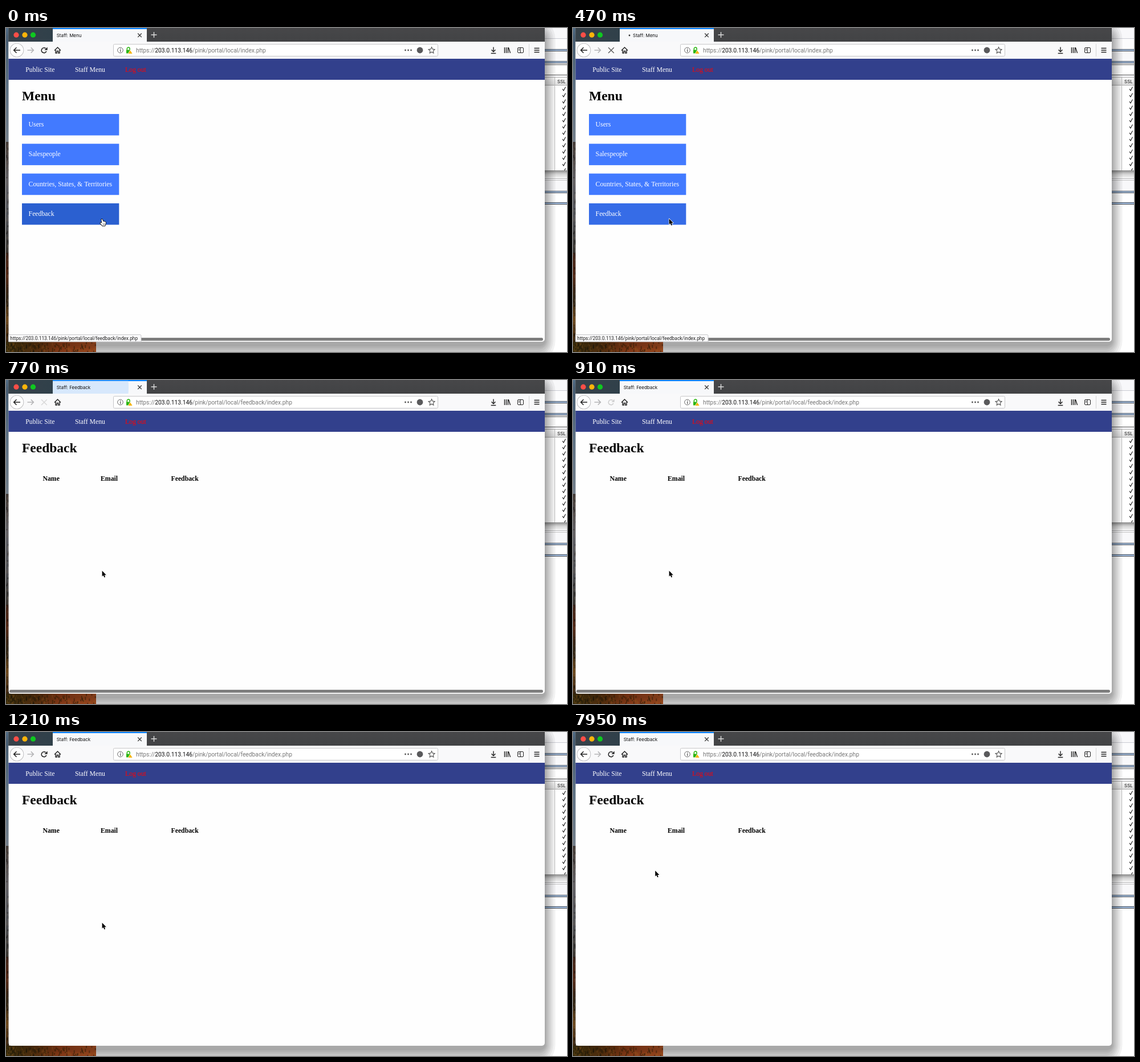
Animation of 984x569 px, one loop 8 s. Source, as an HTML page with a canvas:

```html
<!DOCTYPE html>
<html lang="en">
<head>
<meta charset="utf-8">
<title>Staff pages</title>
<style>
html, body { margin: 0; width: 100%; height: 100%; overflow: hidden; background: #fff; }
canvas { display: block; width: 984px; height: 569px; }
</style>
</head>
<body>
<canvas id="stage" width="984" height="569"></canvas>
<script>
const W = 984, H = 569, LOOP = 8000;
const SERIF = '"Liberation Serif", Times, serif';
const SANS = 'Roboto, "Liberation Sans", sans-serif';
const UI = 'Inter, "Liberation Sans", sans-serif';
const HOST = '203.0.113.146', DIR = '/pink/portal/local';
const stage = document.getElementById('stage').getContext('2d');
let g = stage;

function box(x, y, w, h, fill) {
  g.fillStyle = fill;
  g.fillRect(x, y, w, h);
}
function round(x, y, w, h, r, fill, edge) {
  g.beginPath();
  g.roundRect(x, y, w, h, r);
  if (fill) { g.fillStyle = fill; g.fill(); }
  if (edge) { g.strokeStyle = edge; g.lineWidth = 1; g.stroke(); }
}
function disc(x, y, r, fill) {
  g.beginPath();
  g.arc(x, y, r, 0, 7);
  g.fillStyle = fill;
  g.fill();
}
function stroke(d, color = '#222', width = 1.4) {
  g.strokeStyle = color;
  g.lineWidth = width;
  g.stroke(new Path2D(d));
}
function shape(d, color) {
  g.fillStyle = color;
  g.fill(new Path2D(d));
}
function text(s, x, y, font, color) {
  g.font = font;
  g.fillStyle = color;
  g.fillText(s, x, y);
  return x + g.measureText(s).width;
}
function ramp(y0, y1, ...colors) {
  const grad = g.createLinearGradient(0, y0, 0, y1);
  colors.forEach((c, i) => grad.addColorStop(i / (colors.length - 1), c));
  return grad;
}
function faded(alpha, draw) {
  if (alpha <= 0) return;
  g.save();
  g.globalAlpha = alpha;
  draw();
  g.restore();
}
let seed = 11;
function rnd() {
  seed = (seed * 16807) % 2147483647;
  return seed / 2147483647;
}

function landscape() {
  box(0, 0, 5, 205, ramp(0, 205, '#5f7f9d', '#86a3bf', '#a8b9ca'));
  box(0, 200, 5, 200, ramp(200, 400, '#60544e', '#8e8d94', '#777a82', '#4c4740'));
  box(0, 395, 5, 156, ramp(395, 551, '#5d3424', '#7b3b20', '#4a3a22', '#a06a2a', '#5b3a18'));
  for (let i = 0; i < 110; i++)
    box(rnd() * 4, 205 + rnd() * 345, 2, 2 + rnd() * 4, rnd() < .5 ? 'rgba(20,18,15,.35)' : 'rgba(190,160,130,.2)');
  const ground = g.createLinearGradient(0, 0, 158, 0);
  ground.addColorStop(0, '#4b3a12');
  ground.addColorStop(.35, '#6c3a12');
  ground.addColorStop(.6, '#a9481a');
  ground.addColorStop(1, '#c25a26');
  box(0, 551, 158, 18, ground);
  for (let i = 0; i < 150; i++) {
    const x = rnd() ** 1.6 * 156;
    box(x, 551 + rnd() * 18, 2, 2 + rnd() * 5, rnd() < .7 ? 'rgba(25,25,5,.4)' : 'rgba(200,130,40,.3)');
  }
}

function backWindow() {
  box(940, 0, 44, 310, '#f8f8fa');
  box(940, 18, 44, 1, '#c9cad2');
  box(940, 19, 44, 18, '#fcfcfd');
  for (const y of [37, 58, 286, 306]) {
    box(940, y, 44, 1, '#48525f');
    box(940, y + 1, 44, 2, '#a9c3e4');
    box(940, y + 3, 44, 1, '#3a3f47');
  }
  box(940, 64, 44, 18, '#fff');
  box(940, 64, 44, 1, '#555');
  box(940, 82, 44, 1, '#555');
  box(940, 87, 44, 14, ramp(87, 101, '#fafafa', '#dcdcdc'));
  box(940, 86, 44, 1, '#aaa');
  box(940, 100, 44, 1, '#aaa');
  box(940, 101, 44, 149, '#fff');
  box(962, 87, 1, 163, '#c4c4c4');
  text('SSL', 967, 96.5, '8px ' + UI, '#111');
  g.save();
  g.beginPath();
  g.rect(960, 101, 24, 149);
  g.clip();
  for (let i = 0; i < 14; i++) {
    const y = 107 + i * 11;
    stroke(`M976 ${y} l2 3 l3.5 -6.5`, '#111', 1.1);
  }
  g.restore();
  box(940, 250, 44, 13, ramp(250, 263, '#8c8c8c', '#d3d3d3', '#f2f2f2'));
  box(940, 264, 44, 1, '#b5b5b5');
  box(940, 267, 44, 1, '#c4c4c4');
  box(940, 290, 44, 16, '#fff');
}

function shadow() {
  for (const d of [31, 25, 20, 16, 12, 8, 5, 2])
    round(4 - d * .6, 12 - d, 941 + d * 1.2, 545 + d * 2, 8 + d, 'rgba(0,0,0,.052)');
}

function toolbar() {
  box(4.5, 24, 940.5, 30, '#f9f9fa');
  disc(19, 39, 12.3, '#b8b8ba');
  disc(19, 39, 11.4, '#fff');
  stroke('M25 39 H14 M18.5 34.2 L13.7 39 L18.5 43.8', '#222', 1.6);
  stroke('M37.5 39 H48 M43.8 34.4 L48.4 39 L43.8 43.6', '#b4b4b6', 1.5);
  stroke('M85 39.5 L90.5 34 L96 39.5 M87 38.5 V44 H89.3 V40.5 H91.7 V44 H94 V38.5', '#222', 1.4);

  round(188.5, 28.5, 569, 21, 2, '#fff', '#c6c6c8');
  g.beginPath();
  g.arc(200.5, 39, 4.8, 0, 7);
  g.strokeStyle = '#666';
  g.lineWidth = 1;
  g.stroke();
  box(200, 38, 1.2, 4, '#555');
  box(200, 36, 1.2, 1.2, '#555');
  stroke('M212.3 39 V36.5 A2.4 2.4 0 0 1 217.1 36.5 V39', '#2ab510', 1.5);
  box(211, 38.5, 7, 6, '#2ab510');
  shape('M218 38 L222.3 45.3 H213.7 Z', '#fff');
  shape('M218 39.2 L221.6 45 H214.4 Z', '#f5b50a');
  for (const x of [700.5, 705.5, 710.5]) disc(x, 39, 1.4, '#555');
  disc(726, 39, 5.4, '#5a5a5c');
  let star = '';
  for (let i = 0; i < 10; i++) {
    const a = i * Math.PI / 5, r = i % 2 ? 2.8 : 5.8;
    star += `${i ? 'L' : 'M'}${746.6 + r * Math.sin(a)} ${39.4 - r * Math.cos(a)}`;
  }
  stroke(star + 'Z', '#555', 1.1);

  stroke('M855 33.5 V41.5 M851.5 38.3 L855 41.8 L858.5 38.3 M850.7 44.5 H859.3');
  stroke('M874.5 34 V44 M877.5 34 V44 M880.5 34 V44 M881.5 34.5 L884.5 44');
  round(897.5, 34.5, 10, 9, 1.5, null, '#222');
  stroke('M902.3 34.5 V43.5 M899 37 H901 M899 39 H901', '#222', 1);
  box(917, 28, 1, 22, '#d4d4d6');
  stroke('M926.5 35.5 H935.5 M926.5 39 H935.5 M926.5 42.5 H935.5');
}

function chrome() {
  round(4.5, -10, 940.5, 561, [0, 0, 5, 5], '#fefefe');
  box(4.5, 0, 940.5, 24, ramp(0, 24, '#474749', '#424345'));
  const tint = g.createLinearGradient(4, 0, 82, 0);
  tint.addColorStop(0, '#37424a');
  tint.addColorStop(1, '#30404a');
  box(4.5, 0, 77.5, 24, tint);
  disc(18, 12.2, 4.6, '#fc4e47');
  disc(33, 12.2, 4.6, '#fdb40a');
  disc(47.5, 12.2, 4.6, '#0fc820');
  box(82, 0, 165, 24, '#f7f8fa');
  box(82, 0, 165, 2, '#0a84ff');
  stroke('M254.5 12 H264.5 M259.5 7 V17', '#ddd', 1.4);
  toolbar();
  box(4.5, 54, 940.5, 37, '#32408c');
  const nav = '11.75px ' + SERIF;
  text('Public Site', 34.3, 77, nav, '#fff');
  text('Staff Menu', 121, 77, nav, '#fff');
  text('Log out', 209, 77, nav, '#f00');
}

const backdrop = document.createElement('canvas');
backdrop.width = W;
backdrop.height = H;
g = backdrop.getContext('2d');
box(0, 0, W, H, '#fff');
landscape();
backWindow();
shadow();
chrome();
g = stage;

// latest value whose start time has passed
function step(t, keys) {
  let value = keys[0][1];
  for (const [at, v] of keys) if (t >= at) value = v;
  return value;
}

function address(path) {
  const font = '10.25px ' + SANS;
  let x = text('https://', 228, 43, font, '#777');
  x = text(HOST, x, 43, font, '#0c0c0d');
  text(path, x, 43, font, '#777');
}

function tab(t) {
  const burst = step(t, [[0, null], [620, [41, 1]], [770, [126, .4]], [910, null]]);
  if (burst) faded(burst[1], () => {
    g.beginPath();
    g.rect(82, 1, 165, 23);
    g.clip();
    disc(89, 12.5, burst[0], '#a5d0ff');
  });
  const dot = step(t, [[0, 0], [140, 92.5], [320, 97], [470, 99], [620, 0]]);
  if (dot) disc(dot, 13, 1.4, '#333');
  text(t < 620 ? 'Staff: Menu' : 'Staff: Feedback', dot ? 105 : 88.7, 15.9, '8px ' + UI, '#0c0c0d');
  stroke('M231.2 9.5 L237.8 16.1 M237.8 9.5 L231.2 16.1', '#333', 1.3);
}

function reloadButton(t) {
  faded(step(t, [[0, 1], [140, .4], [320, 0], [910, .2], [1060, .6], [1210, 1]]), () => {
    g.beginPath();
    g.arc(66.7, 39.2, 4.4, .35, 5.4);
    g.strokeStyle = '#222';
    g.lineWidth = 1.6;
    g.stroke();
    shape('M72.6 33.6 V38.8 H67.4 Z', '#222');
  });
  faded(step(t, [[0, 0], [140, .4], [320, .65], [470, .7], [620, .4], [770, .15], [910, 0]]), () =>
    stroke('M62 34.2 L71.8 44 M71.8 34.2 L62 44', '#222', 1.5));
}

function menuPage(t) {
  text('Menu', 28, 127, 'bold 23.5px ' + SERIF, '#000');
  ['Users', 'Salespeople', 'Countries, States, & Territories', 'Feedback'].forEach((s, i) => {
    const y = 151 + i * 52.3;
    const hot = t < 140 ? '#2b60d0' : '#366ce7';
    box(28, y, 170.3, 37.6, i === 3 ? hot : '#427aff');
    text(s, 39.6, y + 22, '11.75px ' + SERIF, '#fff');
  });
}

function feedbackPage() {
  text('Feedback', 28, 127, 'bold 23.5px ' + SERIF, '#000');
  const head = 'bold 11.75px ' + SERIF;
  text('Name', 64.5, 177, head, '#000');
  text('Email', 166, 177, head, '#000');
  text('Feedback', 289.5, 177, head, '#000');
}

function outlined(d, fill, edge, width) {
  g.lineJoin = 'round';
  stroke(d, edge, width);
  shape(d, fill);
  g.lineJoin = 'miter';
}

function pointer(t) {
  const [x, y] = step(t, [[0, [165, 335]], [470, [168, 334]], [7650, [156, 274.5]], [7800, [142.7, 244]], [7950, [143.6, 242.6]]]);
  g.save();
  g.translate(x, y);
  if (t < 470) {
    outlined('M2.3 1.2 Q3.3 .2 4.2 1.3 L5.2 4.6 Q6.3 4 7 5 Q8.2 4.5 8.7 5.6 Q10 5.4 10 6.8 L9.6 9.6 L8.6 12.3 H4 L.9 8.6 Q-.2 7.3 1 6.7 Q2 6.5 3.3 8 Z', '#fff', '#111', 1.7);
    stroke('M5.2 8.3 V10.8 M6.8 8.3 V10.8 M8.3 8.3 V10.8', '#333', .6);
  } else {
    outlined('M.6 1 V11 L2.8 9 L4.4 12.7 L6.1 12 L4.6 8.4 H7.8 Z', '#000', '#fff', 1.5);
  }
  g.restore();
}

function draw(t) {
  const menu = t < 620;
  g.drawImage(backdrop, 0, 0);
  tab(t);
  reloadButton(t);
  address(DIR + (menu ? '' : '/feedback') + '/index.php');
  if (menu) menuPage(t); else feedbackPage();
  faded(step(t, [[0, 1], [1060, .5], [1210, 0]]), () =>
    round(6, 544, 936, 5.2, 2.6, '#7d7d7d'));
  if (menu) {
    round(4.5, 538.5, 232.5, 12.5, [0, 2, 0, 0], '#f9f9fa', '#c8c8ca');
    text('https://' + HOST + DIR + '/feedback/index.php', 7.3, 547.5, '8.4px ' + SANS, '#222');
  }
  pointer(t);
}

const start = performance.now();
function tick(now) {
  draw(Math.max(0, now - start) % LOOP);
  requestAnimationFrame(tick);
}
draw(0);
requestAnimationFrame(tick);
</script>
</body>
</html>
```
